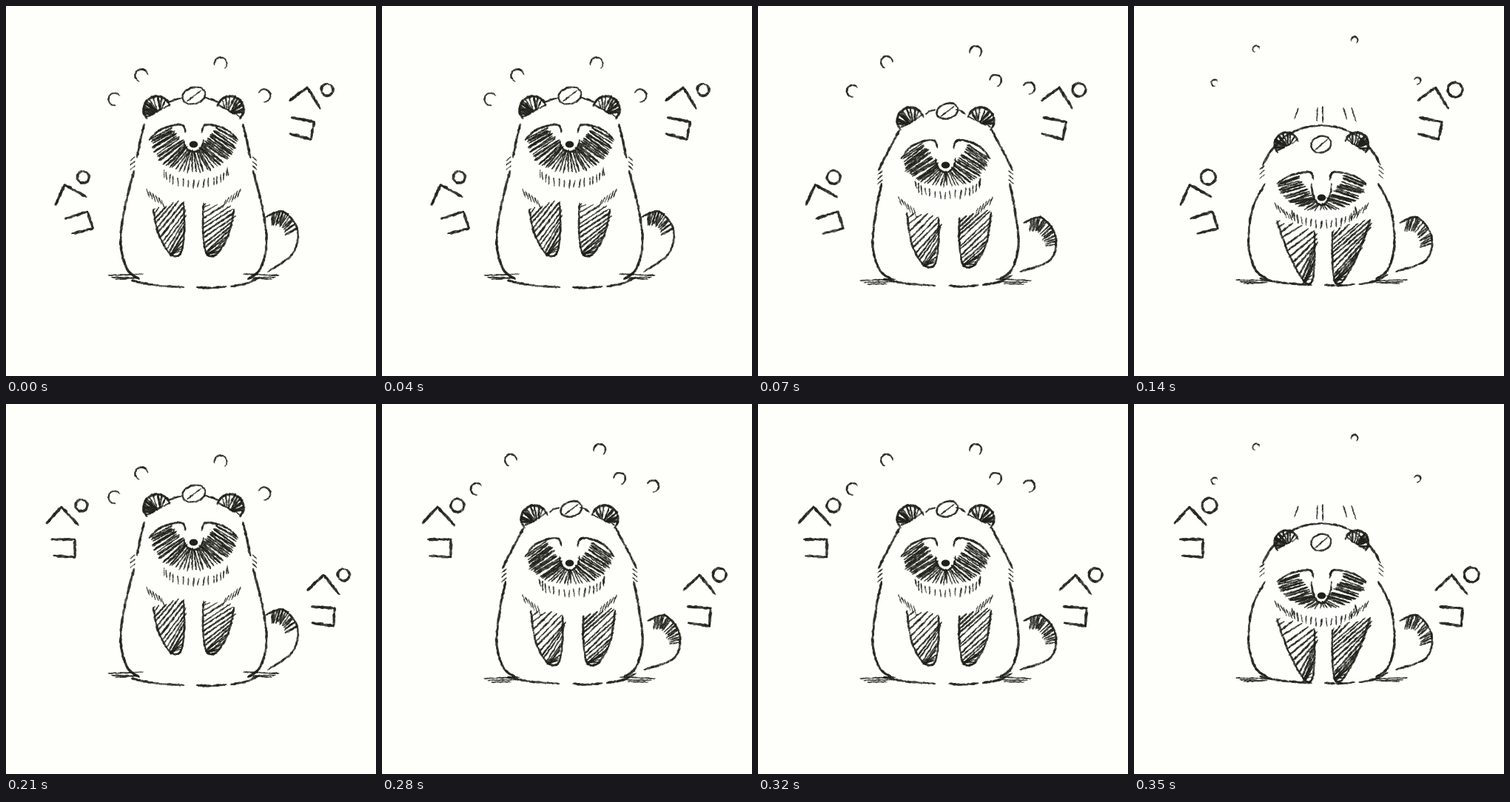
Write an HTML page with a canvas that moves like this. It is 500 px wide and 500 px high and loops after 420 ms.

```html
<!DOCTYPE html>
<html lang="ja">
<head>
<meta charset="utf-8">
<title>ペコペコ</title>
<style>
html, body { margin: 0; width: 100%; height: 100%; overflow: hidden; background: #fefefa; }
canvas { display: block; width: 500px; height: 500px; }
</style>
</head>
<body>
<canvas id="stage" width="500" height="500"></canvas>
<script>
const ctx = document.getElementById('stage').getContext('2d');
const STEP = 70, STEPS = 6, PI = Math.PI;
const MID = 253.5; // axis of symmetry
let seed = 1;

function rnd() {
  seed = (seed * 16807) % 2147483647;
  return seed / 2147483647;
}
const jit = s => (rnd() - 0.5) * 2 * s;
const flip = pts => pts.map(([x, y]) => [2 * MID - x, y]);
const mix = ([x, y], [p, q], t) => [x + (p - x) * t, y + (q - y) * t];

// Point on a Catmull-Rom curve, u from 0 to 1
function at(pts, u) {
  const n = pts.length - 1, f = Math.min(u * n, n - 1e-6), i = Math.floor(f), t = f - i;
  const p = k => pts[Math.max(0, Math.min(n, i + k))];
  const a = p(-1), b = p(0), c = p(1), d = p(2);
  return [0, 1].map(k => b[k] + 0.5 * t * (c[k] - a[k] +
    t * (2 * a[k] - 5 * b[k] + 4 * c[k] - d[k] + t * (3 * (b[k] - c[k]) + d[k] - a[k]))));
}

// Soft pencil line with uneven width and tone
function pen(w, pts) {
  let len = 0;
  for (let i = 1; i < pts.length; i++) len += Math.hypot(pts[i][0] - pts[i - 1][0], pts[i][1] - pts[i - 1][1]);
  const n = Math.max(2, Math.round(len / 2));
  let from = at(pts, 0);
  for (let i = 1; i <= n; i++) {
    const [x, y] = at(pts, i / n), to = [x + jit(0.4), y + jit(0.4)];
    ctx.globalAlpha = 0.45 + 0.45 * rnd();
    ctx.lineWidth = w * Math.min(1, 0.6 + Math.min(i, n - i) * 0.12) * (0.7 + 0.6 * rnd());
    ctx.beginPath();
    ctx.moveTo(...from);
    ctx.lineTo(...to);
    ctx.stroke();
    from = to;
  }
  ctx.globalAlpha = 1;
}

function both(w, pts) {
  pen(w, pts);
  pen(w, flip(pts));
}

function bent(w, pts) {
  for (let i = 1; i < pts.length; i++) pen(w, [pts[i - 1], pts[i]]);
}

function arc(x, y, rx, ry, from, to, tilt = 0) {
  return Array.from({ length: 9 }, (_, i) => {
    const a = from + (to - from) * i / 8, p = rx * Math.cos(a), q = ry * Math.sin(a);
    return [x + p * Math.cos(tilt) - q * Math.sin(tilt), y + p * Math.sin(tilt) + q * Math.cos(tilt)];
  });
}

// Strokes from curve a to curve b
function hatch(a, b, n, w, from = 0, to = 1, rag = 1.5) {
  for (let i = 0; i < n; i++) {
    const u = from + (to - from) * (i + 0.5) / n;
    pen(w * (0.8 + 0.4 * rnd()), [at(a, u), at(b, u)].map(([x, y]) => [x + jit(rag), y + jit(rag)]));
  }
}

// Left-hand key points of each pose; the right side is mirrored.
// face: centre height, depth, brow lift, muzzle drop
const poses = [
  {
    ear: [204, 140, 18], crown: [[220, 130], [230, 126], [239, 124]], leaf: [254, 121, 16, 11],
    head: [[187, 160], [182, 180], [177, 205]], tuft: [171, 212], shoulder: [173, 223],
    face: [179, 46, 14, 17], ruff: 213, chest: 247, armShift: 0,
    arm: [[199, 275], [206, 308], [222, 335], [240, 266], [241, 302], [236, 334]],
    tail: 0, base: 380, ground: 364
  },
  {
    ear: [206, 155, 18], crown: [[227, 146], [232, 142], [240, 140]], leaf: [256, 142, 15, 10],
    head: [[191, 168], [175, 198], [163, 222]], tuft: [165, 231], shoulder: [167, 240],
    face: [204, 40, 18, 20], ruff: 229, chest: 258, armShift: 9,
    arm: [[201, 279], [208, 322], [224, 350], [244, 286], [244, 318], [239, 349]],
    tail: 8, base: 378, ground: 371
  },
  {
    ear: [206, 187, 16], crown: [[204, 176], [228, 165], [254, 161]], leaf: [253, 187, 14, 11],
    head: [[202, 178], [185, 196], [174, 215]], tuft: [173, 224], shoulder: [177, 240],
    face: [238, 39, 9, 30], ruff: 268, chest: 266, armShift: 5,
    arm: [[193, 290], [208, 332], [229, 371], [244, 305], [244, 335], [241, 371]],
    tail: 8, base: 377, ground: 370
  }
];

function ear([x, y, r]) {
  const rim = arc(x, y, r, r, 2.4, 6), inner = rim.map((p, i) => mix(mix(rim[0], rim[8], i / 8), [x, y], 0.5));
  for (const side of [p => p, flip]) {
    pen(3.2, side(rim));
    pen(2.2, side(inner));
    hatch(side(rim), side(inner), 10, 2.4);
    hatch(side(rim), side(inner), 5, 2.8, 0.1, 0.45);
  }
}

function leaf([x, y, rx, ry]) {
  pen(2.4, arc(x, y, rx, ry, 0, 2 * PI, -0.3));
  pen(2, [[x - rx * 0.6, y + ry * 0.7], [x + rx * 0.6, y - ry * 0.6]]);
}

function face([y, depth, lift, drop]) {
  const fan = f => Array.from({ length: 13 }, (_, i) => f(Math.cos(PI * i / 12), Math.sin(PI * i / 12)));
  const inner = fan((c, s) => [MID + c * (15 + 15 * c ** 6), y + drop * s - lift * c ** 4]);
  const outer = fan((c, s) => [MID + 58 * c, y + depth * s]);
  hatch(inner, outer, 34, 2.1);
  for (const u of [0, 0.68]) hatch(inner, outer, 8, 2.4, u, u + 0.32, 2.5);
  both(2.6, [[-60, 2], [-48, -lift * 0.7], [-31, -lift - 3], [-15, -lift - 4], [-11, -lift + 6]].map(([a, b]) => [MID + a, y + b]));
  pen(2.5, arc(MID, y + 2, 13.5, drop - 1, PI, 0));
  ctx.beginPath();
  ctx.ellipse(MID, y + drop - 9, 5.8, 4.6, 0, 0, 7);
  ctx.fill();
}

function arms([a, b, c, d, e, f], shift) {
  const moved = pts => flip(pts).map(([x, y]) => [x + shift, y]);
  const outline = [a, b, c, f, e, d];
  hatch([a, b, c, c], [a, d, e, f], 17, 2.2);
  hatch(moved([d, e, f, f]), moved([d, a, b, c]), 17, 2.2);
  pen(2.6, outline);
  pen(2.6, moved(outline));
}

function tail(d) {
  const edge = [[351, 285], [375, 278], [394, 303], [387, 335]].map(([x, y]) => [x + d, y + d]);
  edge.push([354, 359]);
  pen(2.6, edge);
  hatch(edge, edge.map(p => mix(p, [356 + d, 322 + d], 0.4)), 16, 2.4, 0.1, 0.5 + d / 80);
}

function floor(base, y) {
  pen(2.8, [[170, base - 9], [200, base - 3], [240, base]]);
  pen(2.8, [[258, base], [278, base + 1], [298, base - 1]]);
  pen(2.8, [[304, base - 1], [325, base - 5], [343, base - 14]]);
  for (let i = 0; i < 3; i++) both(1.8, [[138 + 5 * i, y + 2.5 * i], [186 - 6 * i, y + 2.5 * i + jit(2)]]);
}

// Sweat flies outwards from the head, its open end facing back
function drop(x, y, r) {
  const away = Math.atan2(y - 180, x - MID);
  pen(2.3, arc(x, y, r, r, away - 2.1, away + 2.1));
}

function sweat(k) {
  const r = [8.5, 8, 4.5][k];
  for (const [x, y, vx, vy] of [[147, 126, -19, -11], [183, 94, -9, -18], [290, 78, 4, -16], [349, 121, 17, -10]])
    drop(x + vx * k, y + vy * k, r);
  if (k === 1) drop(321, 101, r);
}

function speedLines() {
  for (const x of [222, 248, 255, 283, 294]) pen(1.9, [[x, 137 + jit(2)], [x + (x - MID) * 0.15, 155 + jit(4)]]);
}

function tanuki(k) {
  const p = poses[k], [tx, ty] = p.tuft;
  ear(p.ear);
  both(2.6, p.crown);
  leaf(p.leaf);
  both(3, p.head);
  for (let i = -1; i < 2; i++) both(2, [[tx + 3, ty + 6 * i - 2], [tx - 3, ty + 6 * i + 3]]);
  both(3, [p.shoulder, [160, 275], [155, 322], [164, 356], [180, 369]]);
  floor(p.base, p.ground);
  tail(p.tail);
  face(p.face);
  const ruff = h => arc(MID + 2, p.ruff + h, 46, 22, 0.15, PI - 0.35);
  hatch(ruff(0), ruff(10), 17, 2.1, 0, 1, 1.3);
  for (let i = 0; i < 6; i++) both(1.8, [[190 + 4 * i, p.chest + 3 * i], [194 + 4 * i, p.chest + 10 + 3 * i + jit(2)]]);
  arms(p.arm, p.armShift);
  sweat(k);
  if (k === 2) speedLines();
}

// Hand-lettered "peko": roof stroke, small ring, hook
function peko(x, y, deg, k) {
  const c = Math.cos(deg * PI / 180), s = Math.sin(deg * PI / 180);
  const put = pts => pts.map(([a, b]) => [x + a * c - b * s, y + a * s + b * c]);
  const [[rx, ry]] = put([[24, -34]]);
  bent(3.6, put([[-23, -10], [-3, -32], [20, -7]]));
  pen(3.2, arc(rx, ry, 8 + k, 8 + k, -1, 2 * PI - 1));
  bent(3.6, put([[-16, 12], [15, 12], [15, 36], [-14, 34]]));
}

function draw(step) {
  const k = step % 3;
  ctx.fillStyle = '#fefefa';
  ctx.fillRect(0, 0, 500, 500);
  ctx.fillStyle = ctx.strokeStyle = '#20201a';
  ctx.lineCap = 'round';
  seed = 4217 + k * 991;
  tanuki(k);
  if (step < 3) {
    peko(92 - 2 * k, 271, -18, k);
    peko(404, 142, 11, k);
  } else {
    peko(78, 171, 0, k);
    peko(430, 263, 4, k);
  }
}

let shown = -1;
function tick() {
  const step = Math.floor(performance.now() / STEP) % STEPS;
  if (step !== shown) draw(shown = step);
  requestAnimationFrame(tick);
}
tick();
</script>
</body>
</html>
```
